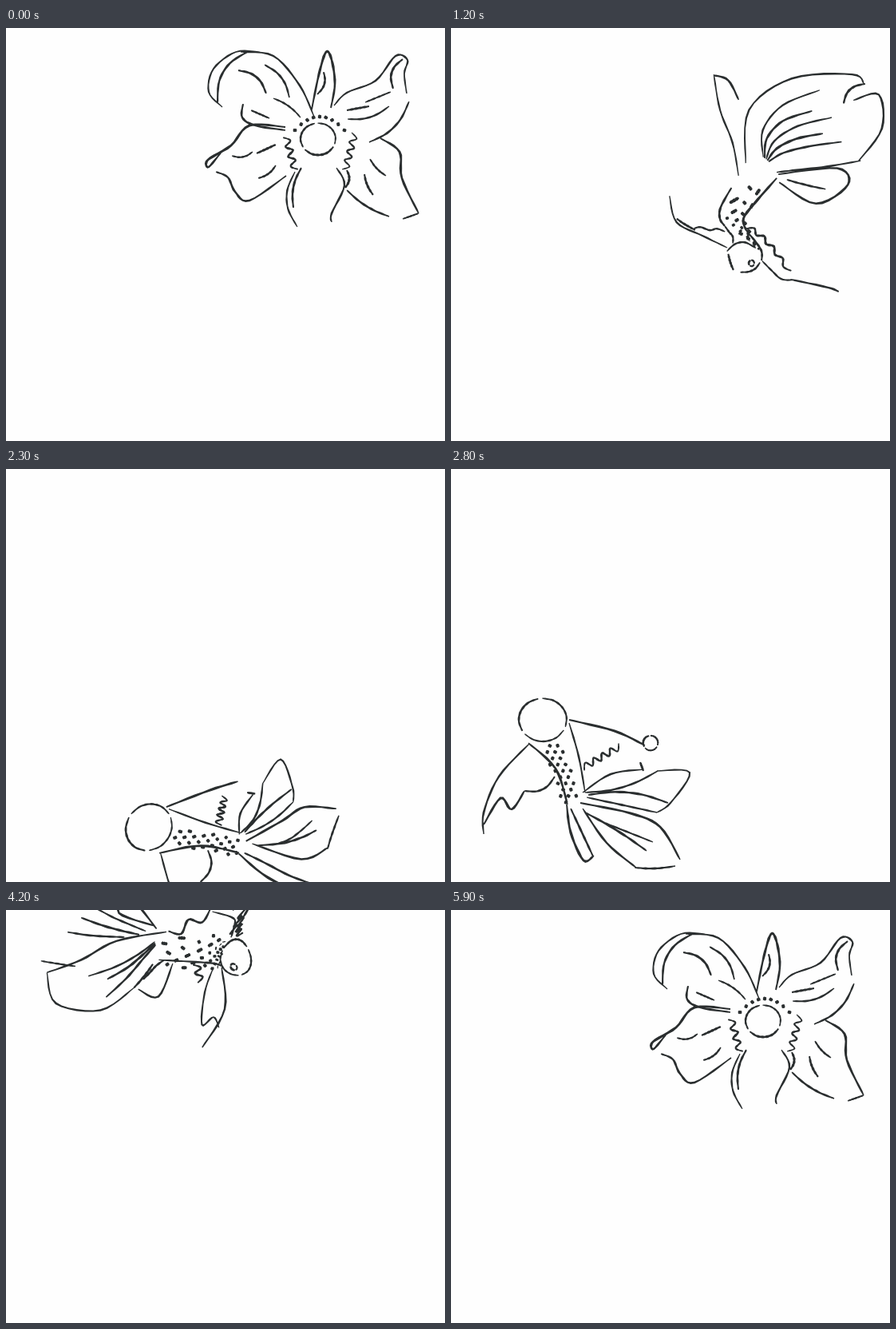
An HTML page that plays this animation: 550x517 px, repeating every 6000 ms.

```html
<!DOCTYPE html>
<html lang="en">
<head>
<meta charset="utf-8">
<title>Ink fish</title>
<style>
html, body { margin: 0; width: 100%; height: 100%; overflow: hidden; background: #fefefe; }
svg { display: block; width: 550px; height: 517px; }
</style>
</head>
<body>
<svg viewBox="0 0 550 517"><path id="ink" fill="#2a2e2f"/></svg>
<script>
const TAU = Math.PI * 2;
const wrap = a => a - TAU * Math.round(a / TAU);
const mix = (a, b, u) => a + (b - a) * u;
const part = i => i * 0.618 % 1;
const pairs = n => n.flatMap((x, i) => i % 2 ? [] : [[x, n[i + 1]]]);

// drawing helpers: each adds strokes to the current pose
let strokes;
const add = (pts, w = 2.1 + 0.9 * part(strokes.length)) => strokes.push({ pts, w });
const line = (...n) => add(pairs(n));

function onArc(x, y, x2, y2, bow, u) {
  const dx = x2 - x, dy = y2 - y, len = Math.hypot(dx, dy) || 1, h = bow * 4 * u * (1 - u);
  return [x + dx * u + dy / len * h, y + dy * u - dx / len * h];
}
const arc = (x, y, x2, y2, bow = 0) => add([0, 0.33, 0.67, 1].map(u => onArc(x, y, x2, y2, bow, u)));

function ring(x, y, rx, ry) {
  for (let k = 0; k < 3; k++) {
    add([0, 1, 2, 3, 4].map(i => {
      const a = 0.5 + (k + i * 0.23) * TAU / 3;
      return [x + rx * Math.cos(a), y + ry * Math.sin(a)];
    }));
  }
}

function frill(x, y, x2, y2) {
  const n = Math.max(4, Math.round(Math.hypot(x2 - x, y2 - y) / 6));
  const pts = [];
  for (let i = 0; i <= n; i++) {
    const [a, b] = onArc(x, y, x2, y2, 0, i / n), s = i % 2 ? 4 : -4;
    const [c, d] = onArc(0, 0, x2 - x, y2 - y, s, 0.5);
    pts.push([a + c - (x2 - x) / 2, b + d - (y2 - y) / 2]);
  }
  add(pts);
}

function dot(x, y, a) {
  const c = Math.cos(a) * 2.3, s = Math.sin(a) * 2.3;
  add([[x - c, y - s], [x, y], [x + c, y + s]], 4);
}

function dots(x, y, x2, y2, n, bow) {
  for (let i = 0; i < n; i++) dot(...onArc(x, y, x2, y2, bow, i / (n - 1)), i * 2);
}

function spots(x, y, x2, y2, wide, n) {
  const along = Math.atan2(y2 - y, x2 - x);
  for (let i = 0; i < n; i++) {
    const u = (i + 0.5) / n, v = (part(i + 1) - 0.5) * wide;
    dot(mix(x, x2, u) - Math.sin(along) * v, mix(y, y2, u) + Math.cos(along) * v, along + (i % 3 - 1) * 0.7);
  }
}

function fan(x, y, ax, ay, bx, by, n) {
  for (let i = 0; i < n; i++) {
    const u = (i + 0.5) / n, tx = mix(ax, bx, u), ty = mix(ay, by, u), e = 0.95 - 0.12 * (i % 2);
    arc(mix(x, tx, 0.1), mix(y, ty, 0.1), mix(x, tx, e), mix(y, ty, e), 7 * (1 - u));
  }
}

function front() {
  line(271,99, 254,80, 260,51, 288,30, 318,30);
  arc(265,94, 304,29, 14);
  line(294,30, 335,35, 368,72, 386,111);
  arc(291,53, 326,82, 8);
  arc(324,46, 355,87, 7);
  arc(335,88, 369,112, 3);
  line(297,95, 296,112, 312,122, 350,128);
  arc(307,103, 330,113);
  line(383,102, 392,58, 401,30, 408,40, 412,70, 407,100);
  arc(398,55, 390,83, 5);
  line(411,97, 427,81, 463,66, 488,35, 503,40, 499,57, 502,82);
  arc(497,39, 485,76, -8);
  arc(505,92, 455,143, 9);
  arc(450,93, 482,80);
  arc(427,103, 455,98);
  arc(428,114, 480,98, -6);
  line(469,138, 493,155, 496,188, 517,232);
  arc(427,203, 480,236, -4);
  arc(497,239, 517,232);
  arc(449,183, 460,209, -2);
  arc(456,164, 476,185, -2);
  line(350,124, 305,122, 282,147, 253,165, 254,174, 270,155);
  line(263,180, 278,187, 287,205, 305,216, 351,185);
  arc(283,160, 309,155, -4);
  arc(314,157, 338,146);
  arc(316,188, 338,172, -3);
  arc(362,180, 365,249, -12);
  arc(370,175, 360,225, -5);
  line(414,175, 424,197, 408,232, 408,243);
  arc(427,178, 425,200, 4);
  frill(351,136, 362,178);
  frill(437,132, 425,178);
  ring(391,139, 22,20);
  dots(362,128, 424,128, 9, 17);
}

function wings() {
  line(230,19, 250,17, 295,22, 343,50, 378,100);
  line(230,19, 256,50, 270,91, 293,102, 289,118);
  arc(303,36, 374,104);
  arc(309,78, 335,93, 2);
  arc(333,92, 370,112, -3);
  line(291,116, 275,128, 284,145, 328,164);
  arc(291,116, 333,130, 5);
  arc(310,143, 360,133, -2);
  line(400,115, 416,75, 460,43, 500,24);
  line(507,20, 517,32, 505,80, 465,122);
  arc(480,58, 414,92, 3);
  arc(480,82, 428,98, 4);
  arc(420,100, 470,104, -13);
  line(405,127, 460,127, 484,121, 512,160);
  line(512,160, 470,168, 415,153);
  arc(415,128, 460,142);
  line(362,175, 372,115, 387,100, 398,120);
  arc(400,110, 408,178, 4);
  arc(387,105, 385,130);
  arc(393,112, 390,140, 2);
  arc(398,122, 386,153, 3);
  arc(361,178, 408,180, 9);
  ring(384,195, 25,24);
  arc(375,220, 388,223, -3);
  frill(341,161, 348,207);
  frill(419,158, 427,214);
  arc(348,208, 317,249, 6);
  arc(305,254, 275,259, 2);
  arc(412,204, 457,277, -4);
  spots(384,138, 384,167, 32, 10);
}

function dive() {
  arc(360,283, 392,191);
  line(392,192, 402,200, 402,218);
  line(365,275, 405,228, 448,202, 495,195, 504,203);
  arc(505,203, 483,220, -5);
  line(492,217, 516,213, 515,245, 488,277);
  fan(368,280, 470,200, 482,262, 5);
  arc(385,288, 490,277, -2);
  line(388,290, 465,284, 472,300, 435,315, 390,297);
  arc(403,295, 448,303);
  arc(335,284, 292,375, -13);
  arc(320,305, 306,327);
  frill(312,322, 328,343);
  frill(360,338, 397,378);
  line(397,386, 437,381, 447,385);
  arc(400,385, 338,406, 7);
  arc(357,290, 340,333);
  arc(340,333, 303,372, 2);
  arc(385,293, 356,345, -6);
  arc(356,345, 337,406, 5);
  arc(288,380, 333,388, 9);
  arc(287,385, 285,412, -2);
  arc(294,419, 332,410, -7);
  ring(314,412, 5,4);
  spots(366,293, 338,388, 17, 24);
}

function rise() {
  ring(115,314, 30,27);
  line(148,314, 205,328, 243,346);
  frill(165,374, 212,347);
  line(148,318, 160,360, 168,405);
  line(97,343, 131,375, 146,420);
  line(98,344, 60,385, 41,430, 41,457);
  line(41,445, 62,412, 76,426, 92,403);
  arc(92,403, 130,385, -8);
  line(165,405, 200,382, 241,376);
  arc(237,367, 241,378);
  arc(168,405, 259,378, -7);
  line(258,378, 299,380, 275,418, 258,430);
  arc(172,408, 272,418, 8);
  arc(170,411, 258,430);
  line(162,418, 225,431, 262,448, 287,489);
  line(165,425, 195,468, 232,499);
  arc(185,440, 253,467);
  arc(168,430, 245,478, 2);
  arc(230,499, 281,497, -2);
  line(145,420, 150,455, 166,490, 179,484);
  arc(150,425, 178,485);
  spots(126,344, 152,416, 24, 24);
}

function cruise() {
  ring(162,80, 30,25);
  ring(176,87, 5,5);
  frill(130,66, 102,90);
  frill(118,92, 75,112);
  arc(100,92, 58,115, -2);
  arc(58,115, 80,120, 3);
  arc(125,85, 73,132, -2);
  frill(73,132, 77,150);
  line(161,108, 169,160, 166,209);
  line(138,132, 140,165, 152,193, 158,178, 168,182);
  frill(117,149, 132,160);
  arc(160,106, 92,169);
  line(65,160, 18,172, 22,189, 60,163);
  line(73,152, 42,207, 28,245, 12,278);
  line(12,278, 40,292, 78,263, 88,220);
  arc(88,220, 90,180);
  fan(80,150, 35,255, 80,255, 3);
  arc(58,173, 0,205, 3);
  arc(55,182, 0,220, 3);
  arc(45,198, 0,238, 2);
  arc(28,253, 0,275);
  arc(95,165, 90,205);
  line(102,163, 110,205, 92,217);
  spots(148,100, 88,162, 36, 32);
}

function approach() {
  arc(232,12, 249,2);
  line(232,12, 255,42, 290,60, 350,66);
  arc(247,5, 344,53, 6);
  arc(275,39, 296,46);
  arc(298,4, 312,9);
  arc(322,3, 366,62, 12);
  arc(323,11, 360,58);
  arc(345,10, 365,55);
  arc(378,8, 367,60, 2);
  arc(392,22, 372,54);
  line(399,5, 400,14, 410,14, 398,46);
  arc(405,26, 384,52);
  arc(330,48, 349,60);
  arc(357,57, 380,67);
  line(295,98, 288,80, 320,66, 355,78, 362,94);
  arc(297,91, 350,77, 5);
  arc(325,95, 358,88, 3);
  line(385,92, 392,58, 406,44, 411,60, 404,102);
  arc(397,53, 392,73, -2);
  ring(392,139, 21,21);
  dots(370,118, 415,113, 7, 4);
  spots(362,68, 374,102, 16, 11);
  arc(362,130, 352,110, -3);
  frill(362,137, 343,156);
  line(367,159, 353,158, 340,185, 328,222);
  arc(346,155, 331,205, -4);
  frill(417,120, 437,155);
  line(398,161, 428,164, 441,190, 449,221);
  arc(438,155, 448,221, -2);
}

// marks: head, tail root, tail tips (left, right), side fin tips (left, right)
const poses = [];
function pose(at, art, ...marks) {
  strokes = [];
  art();
  const pts = pairs(marks), [h, ...rest] = pts, prev = poses.at(-1);
  const polar = rest.map(([x, y]) => [Math.atan2(y - h[1], x - h[0]), Math.hypot(x - h[0], y - h[1])]);
  const a = polar[0][0];
  const turn = prev ? prev.turn + wrap(a - prev.turn) : a;
  poses.push({ at, pts, turn, strokes, limbs: polar.map(([b, r]) => [wrap(b - a), r]) });
}
pose(0, front, 391,139, 392,105, 256,83, 502,40, 364,248, 408,242);
pose(700, wings, 384,195, 386,107, 230,18, 517,24, 277,259, 458,278);
pose(1700, dive, 305,398, 372,285, 395,191, 515,235, 335,284, 447,385);
pose(2800, rise, 117,315, 157,418, 287,489, 167,492, 243,346, 41,455);
pose(3600, cruise, 165,82, 82,160, 40,292, 15,182, 167,208, 58,115);
pose(4900, approach, 392,140, 366,70, 232,12, 409,14, 328,221, 449,221);
pose(5900, front, ...poses[0].pts.flat());

// extra points the head passes between the poses
const track = poses.map(p => [p.at, ...p.pts[0]]);
const via = (...k) => track.push(k);
via(1400, 355,325);
via(2100, 236,448);
via(2500, 128,424);
via(3200, 100,205);
via(4200, 282,62);
track.sort((a, b) => a[0] - b[0]);

function headAt(t) {
  const n = track.length;
  const i = track.findLastIndex(k => k[0] <= t);
  if (i === n - 1) return track[i].slice(1);
  const a = track[i], b = track[i + 1], d = b[0] - a[0], u = (t - a[0]) / d;
  const slope = (j, c) => {
    const p = track[Math.max(0, j - 1)], q = track[Math.min(n - 1, j + 1)];
    return (q[c] - p[c]) / (q[0] - p[0]) * d;
  };
  return [1, 2].map(c => {
    const m = slope(i, c), k = slope(i + 1, c), e = b[c] - a[c];
    return a[c] + u * (m + u * (3 * e - 2 * m - k + u * (m + k - 2 * e)));
  });
}

// bends a point along with the moved marks (weighted similarity fit)
function bend([x, y], from, to) {
  const w = from.map(([a, b]) => 1 / ((a - x) ** 2 + (b - y) ** 2 + 60));
  const sum = w.reduce((s, v) => s + v);
  const mean = (m, c) => m.reduce((s, p, i) => s + w[i] * p[c], 0) / sum;
  const px = mean(from, 0), py = mean(from, 1), qx = mean(to, 0), qy = mean(to, 1);
  let re = 0, im = 0, size = 0;
  from.forEach((p, i) => {
    const a = p[0] - px, b = p[1] - py, c = to[i][0] - qx, d = to[i][1] - qy;
    re += w[i] * (a * c + b * d);
    im += w[i] * (a * d - b * c);
    size += w[i] * (a * a + b * b);
  });
  re /= size;
  im /= size;
  const dx = x - px, dy = y - py;
  return [qx + re * dx - im * dy, qy + re * dy + im * dx];
}

function curve(p) {
  const out = [], n = p.length - 1, steps = 6;
  for (let i = 0; i < n; i++) {
    const a = p[Math.max(0, i - 1)], b = p[i], c = p[i + 1], d = p[Math.min(n, i + 2)];
    for (let k = 0; k < steps; k++) {
      const u = k / steps;
      out.push([0, 1].map(j => b[j] + u / 2 * (c[j] - a[j] + u * (2 * a[j] - 5 * b[j] + 4 * c[j] - d[j]
        + u * (3 * b[j] - a[j] - 3 * c[j] + d[j])))));
    }
  }
  out.push(p[n]);
  return out;
}

// outline of a brush stroke, thinner at both ends and slightly uneven
function brush(pts, w) {
  const c = curve(pts), n = c.length - 1, left = [], right = [];
  c.forEach(([x, y], i) => {
    const a = c[Math.max(0, i - 1)], b = c[Math.min(n, i + 1)];
    const dx = b[0] - a[0], dy = b[1] - a[1], len = Math.hypot(dx, dy) || 1;
    const body = 0.55 + 0.5 * Math.sqrt(Math.abs(Math.sin(Math.PI * i / n)));
    const r = w / 2 * body * (1 + 0.16 * Math.sin(i * 1.9 + w * 7));
    left.push([x - dy / len * r, y + dx / len * r]);
    right.unshift([x + dy / len * r, y - dx / len * r]);
  });
  return 'M' + left.concat(right).map(p => p[0].toFixed(1) + ' ' + p[1].toFixed(1)).join('L') + 'Z';
}

function bubble(t) {
  const u = (t - 2800) / 1000;
  strokes = [];
  if (u >= 0 && u < 1) {
    const s = 1 - (1 - u) ** 2, r = 9.3 + 7.8 * s;
    ring(250 + 131 * s, 343 - 67 * s, r, r);
  }
  return strokes.map(s => brush(s.pts, s.w)).join('');
}

const ink = document.getElementById('ink');

function draw(t) {
  const i = poses.findLastIndex(p => p.at <= t);
  const a = poses[i], b = poses[i + 1] || a;
  const u = a === b ? 0 : (t - a.at) / (b.at - a.at);
  const [hx, hy] = headAt(t), turn = mix(a.turn, b.turn, u);
  const now = [[hx, hy]];
  a.limbs.forEach(([g, r], k) => {
    const dir = turn + g + wrap(b.limbs[k][0] - g) * u, far = mix(r, b.limbs[k][1], u);
    now.push([hx + far * Math.cos(dir), hy + far * Math.sin(dir)]);
  });
  const p = u < 0.5 ? a : b;
  ink.setAttribute('d', p.strokes.map(s => brush(s.pts.map(q => bend(q, p.pts, now)), s.w)).join('') + bubble(t));
}

let start, last;
function tick(time) {
  start ??= time;
  const t = Math.floor((time - start) / 100) * 100 % 6000;
  if (t !== last) draw(last = t);
  requestAnimationFrame(tick);
}
draw(0);
requestAnimationFrame(tick);
</script>
</body>
</html>
```
